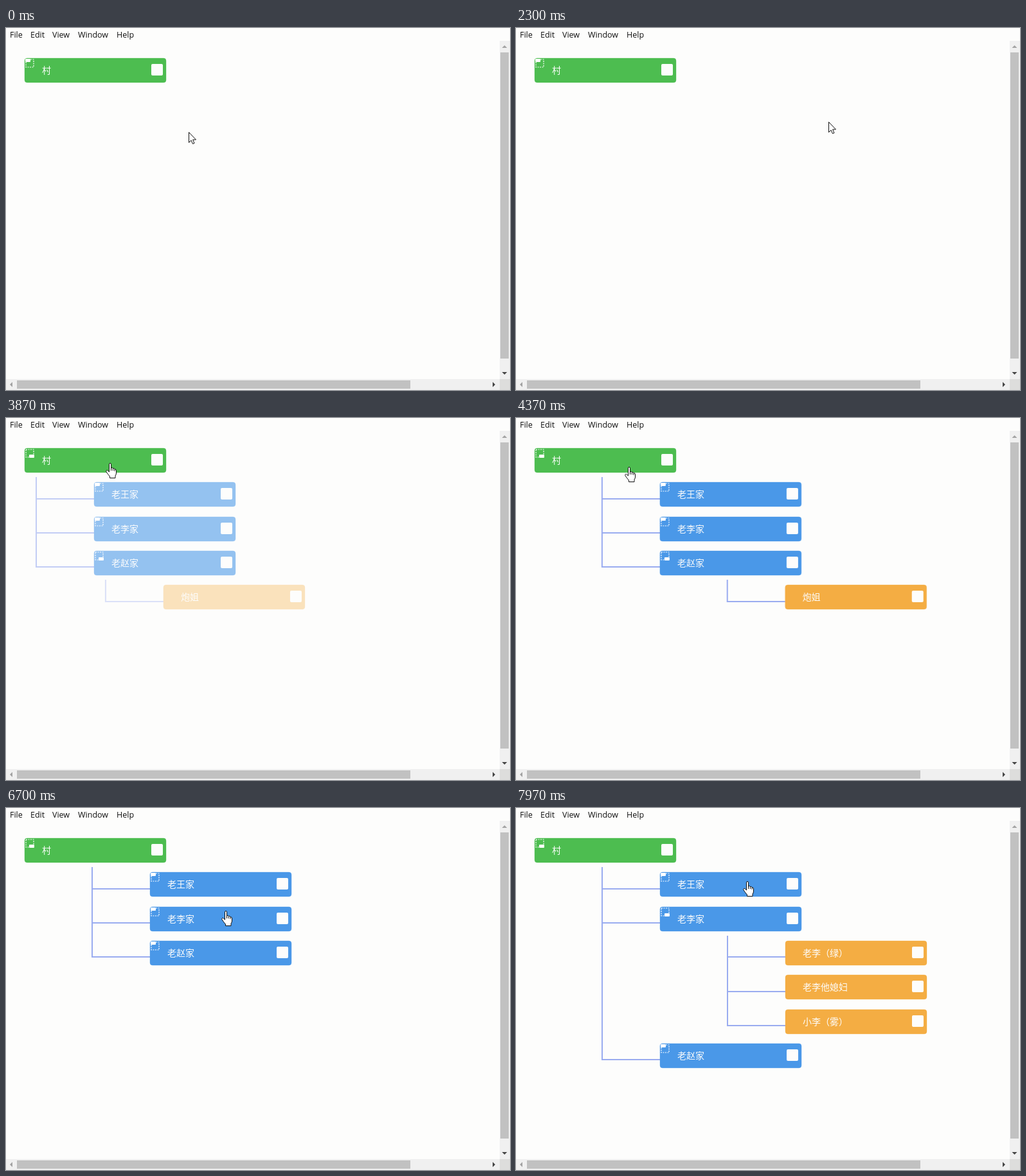
An HTML page for the animation above (8 s loop, 784 px wide and 564 px high).

```html
<!DOCTYPE html>
<html lang="zh-CN">
<head>
<meta charset="utf-8">
<style>
html, body { margin: 0; width: 100%; height: 100%; overflow: hidden; background: #fdfdfc; }
svg { display: block; width: 784px; height: 564px; }
.menu { font: 12.5px "Open Sans", "Noto Sans", sans-serif; fill: #111; }
.label { font: 14px "Noto Sans CJK SC", "Noto Sans CJK", sans-serif; fill: #fdfdfc; }
</style>
</head>
<body>
<svg id="stage" viewBox="0 0 784 564" xmlns="http://www.w3.org/2000/svg"></svg>
<script>
const LOOP = 8000, SLIDE = 800;
const ROW = 160 / 3, INDENT = 195, TRAVEL = 210;
const GREEN = '#4dbd50', BLUE = '#4a98e8', ORANGE = '#f4ad43', LINE = '#9aacf0';
const PAGE = '#fdfdfc', TRACK = '#f0f0f0', THUMB = '#c1c1c1';
const OPEN_ROOT = 3600, CLOSE_ZHAO = 5740, OPEN_LI = 6913;
const stage = document.getElementById('stage');

function add(parent, tag, attrs = {}, text = '') {
  const el = document.createElementNS('http://www.w3.org/2000/svg', tag);
  for (const k in attrs) el.setAttribute(k, attrs[k]);
  if (text) el.textContent = text;
  parent.append(el);
  return el;
}
const rect = (parent, x, y, width, height, fill, more) =>
  add(parent, 'rect', { x, y, width, height, fill, ...more });
const clamp = x => Math.min(1, Math.max(0, x));

// Standard "ease" timing curve, solved by bisection
function ease(x) {
  if (x <= 0) return 0;
  if (x >= 1) return 1;
  let lo = 0, hi = 1;
  for (let i = 0; i < 20; i++) {
    const s = (lo + hi) / 2;
    if (0.75 * s - 0.75 * s * s + s ** 3 < x) lo = s; else hi = s;
  }
  return 0.3 * lo * (1 - lo) ** 2 + 3 * lo * lo * (1 - lo) + lo ** 3;
}

const leaf = label => ({ label, color: ORANGE, kids: [] });
const house = (label, ...names) => ({ label, color: BLUE, icon: true, kids: names.map(leaf) });
const li = house('老李家', '老李（绿）', '老李他媳妇', '小李（雾）');
const zhao = house('老赵家', '炮姐');
const root = { label: '村', color: GREEN, icon: true, kids: [house('老王家'), li, zhao] };

function build(node, parent) {
  node.show = 0;
  node.box = add(parent, 'g');
  rect(node.box, 0, 0, 220, 38, node.color, { rx: 4, stroke: node.color, 'stroke-opacity': 0.35 });
  rect(node.box, 197, 9, 18, 18, PAGE, { rx: 2 });
  add(node.box, 'text', { x: 27, y: 24, class: 'label' }, node.label);
  if (node.icon) {
    rect(node.box, 2, 2, 12, 12, 'none', { stroke: '#fff', 'stroke-width': 1.2, 'stroke-dasharray': '2 1.5' });
    node.mark = rect(node.box, 1, 1, 8, 5, '#fff', { rx: 1 });
  }
  if (node.kids.length) {
    node.group = add(parent, 'g');
    node.lines = add(node.group, 'path', { fill: 'none', stroke: LINE, 'stroke-width': 2 });
    node.kids.forEach(kid => build(kid, node.group));
  }
}

// Places a node and its open branch; x is relative to the enclosing group
let row, boxes;
function place(node, x, absX) {
  const top = 47 + ROW * row++, y = Math.round(top);
  node.joint = Math.round(top + 25.3);
  boxes.push([absX, y]);
  node.box.setAttribute('transform', `translate(${x} ${y})`);
  if (node.mark) {
    node.mark.setAttribute('x', node.open ? 7 : 1);
    node.mark.setAttribute('y', node.open ? 10 : 1);
  }
  if (!node.group) return;
  node.group.style.display = node.show > 0 ? '' : 'none';
  if (!node.show) return;
  const shift = INDENT - TRAVEL * (1 - node.show);
  node.group.setAttribute('transform', `translate(${x + shift} 0)`);
  node.group.setAttribute('opacity', node.show);
  node.kids.forEach(kid => place(kid, 0, absX + shift));
  const last = node.kids.at(-1).joint;
  node.lines.setAttribute('d', `M-90 ${y + 45}V${last + 1}` + node.kids.map(k => `M-90 ${k.joint}H0`).join(''));
}

// Pointer moves: start, end, x, y; it rests in between
const moves = [
  [30, 830, 500, 88], [860, 1600, 232, 36], [1670, 1900, 344, 84], [2299, 2300, 486, 146],
  [2470, 3500, 162, 70], [4130, 4370, 176, 76], [4500, 5050, 43, 105], [5050, 5580, 467, 270],
  [5610, 5780, 335, 214], [6480, 6700, 342, 160], [6900, 7190, 361, 111], [7740, 7950, 360, 114]
];

function pointerAt(t) {
  let x = 284, y = 162;
  for (const [from, to, toX, toY] of moves) {
    const p = clamp((t - from) / (to - from)), k = p * p * (3 - 2 * p);
    x += (toX - x) * k;
    y += (toY - y) * k;
  }
  return [Math.round(x), Math.round(y)];
}

build(root, stage);

// Window frame: menu and scroll bars
[['File', 6], ['Edit', 38], ['View', 72], ['Window', 112], ['Help', 172]]
  .forEach(([word, x]) => add(stage, 'text', { x, y: 15, class: 'menu' }, word));
rect(stage, 768, 20, 16, 527, TRACK);
rect(stage, 0, 547, 768, 17, TRACK);
rect(stage, 768, 547, 16, 17, '#dddddc');
rect(stage, 769, 38, 13, 477, THUMB);
rect(stage, 17, 549, 612, 13, THUMB);
const tip = (x, y, turn, fill) =>
  add(stage, 'path', { d: 'M-4 2h8l-4-4z', fill, transform: `translate(${x} ${y}) rotate(${turn})` });
tip(775.5, 29, 0, '#a3a3a3');
tip(775.5, 538, 180, '#454545');
tip(8, 555.5, -90, '#a3a3a3');
tip(759, 555.5, 90, '#454545');

const outline = { fill: '#fff', stroke: '#111', 'stroke-width': 1, 'stroke-linejoin': 'round' };
const arrow = add(stage, 'path', { ...outline, d: 'M.5.5V16.5L4 13 6.5 18.5 9 17.5 6.6 12H11.5Z' });
const hand = add(stage, 'g');
add(hand, 'path', { ...outline, d: 'M-1.5 2.2Q-1.5.5 0 .5T1.5 2.2V8Q4 6.5 4.3 8.6 6.5 7.5 7 9.8 9.5 9.5 9.5 12V16Q9.5 18 8 20V23.5H-.5V21Q-3 18.5-6.2 13.5-6 10-3.4 12.2L-1.5 14Z' });
add(hand, 'path', { d: 'M1.5 8v4M4.3 8.6v3.6M7 9.8v3', fill: 'none', stroke: '#111' });

function draw(t) {
  root.show = ease((t - OPEN_ROOT) / SLIDE);
  li.show = ease((t - OPEN_LI) / SLIDE);
  zhao.show = t < CLOSE_ZHAO ? root.show : 1 - ease((t - CLOSE_ZHAO) / SLIDE);
  root.open = t >= OPEN_ROOT;
  li.open = t >= OPEN_LI;
  zhao.open = t < CLOSE_ZHAO;
  row = 0;
  boxes = [];
  place(root, 29, 29);

  const [x, y] = pointerAt(t);
  const over = boxes.some(([bx, by]) => x >= bx && x < bx + 220 && y >= by && y < by + 38);
  arrow.style.display = over ? 'none' : '';
  hand.style.display = over ? '' : 'none';
  (over ? hand : arrow).setAttribute('transform', `translate(${x} ${y})`);
}

const start = performance.now();
function tick() {
  draw((performance.now() - start) % LOOP);
  requestAnimationFrame(tick);
}
tick();
</script>
</body>
</html>
```
